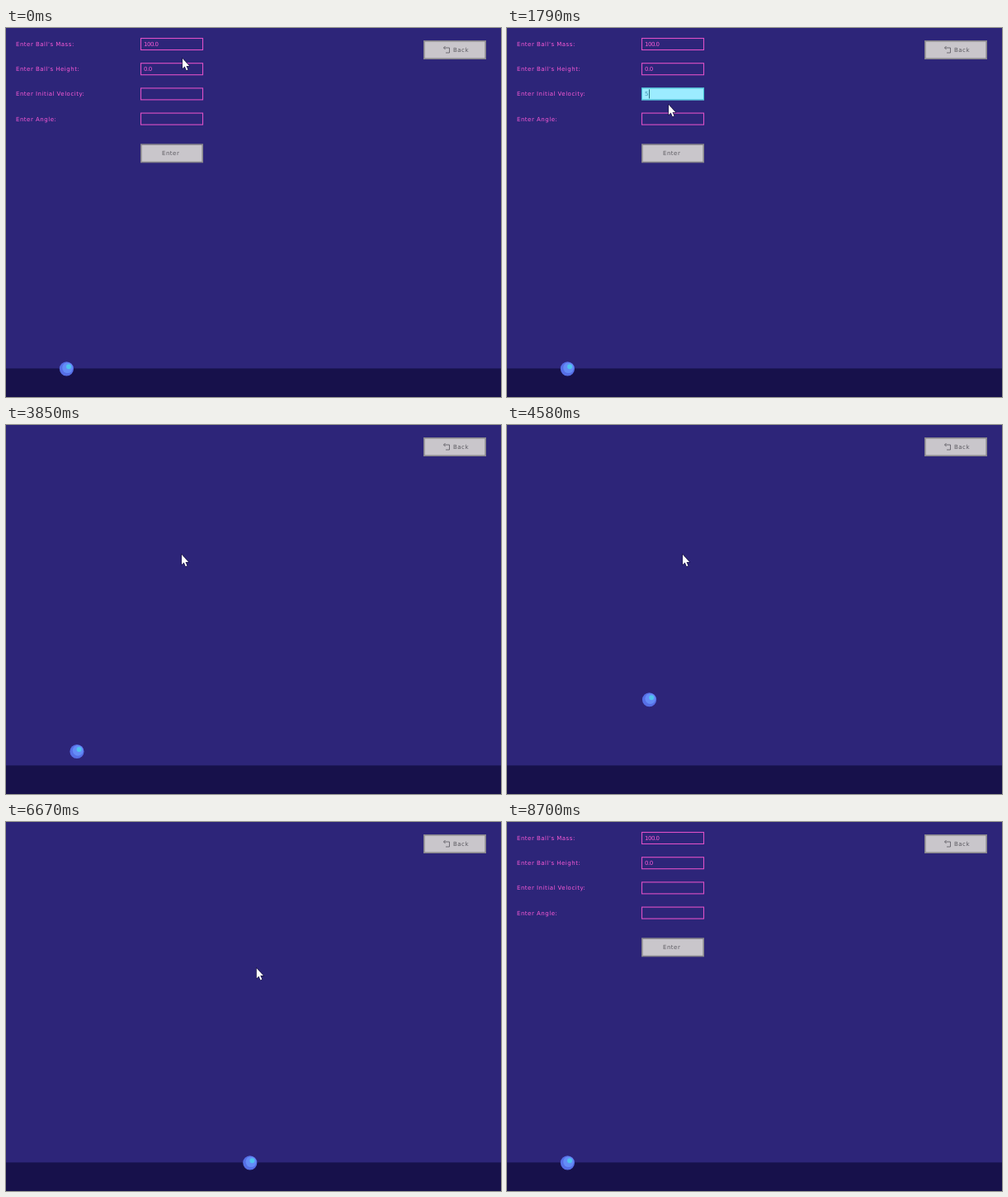
Write an HTML page with a canvas that moves like this. It is 600 by 447 pixels and loops after 9580 ms.

```html
<!DOCTYPE html>
<html lang="en">
<head>
<meta charset="utf-8">
<title>Projectile form</title>
<style>
  html, body { margin: 0; width: 100%; height: 100%; overflow: hidden; background: #2d2579; }
  canvas { display: block; }
</style>
</head>
<body>
<canvas id="stage" width="600" height="447"></canvas>
<script>
const ctx = document.getElementById('stage').getContext('2d');
const LOOP = 9580;
const PINK = '#fa5ad6';
const LEFT = 12, COLUMN = 163, TOP = 12, ROW = 30.2, WIDTH = 76;
const LAUNCH = 3745, FLIGHT = 1875, SPEED = 0.1186, APEX = 81;
const FORM_OUT = 3640, FORM_IN = 7480;
const VELOCITY_FOCUS = 1450, ANGLE_FOCUS = 2390;

function ease(t, from, to) {
  const u = Math.min(Math.max((t - from) / (to - from), 0), 1);
  return u * u * (3 - 2 * u);
}

function rect(x, y, w, h, color) {
  ctx.fillStyle = color;
  ctx.fillRect(x, y, w, h);
}

function disc(x, y, r, color) {
  ctx.fillStyle = color;
  ctx.beginPath();
  ctx.arc(x, y, r, 0, 2 * Math.PI);
  ctx.fill();
}

function text(str, x, y, color, spacing = 0.5) {
  ctx.font = '7px "DejaVu Sans", sans-serif';
  ctx.textBaseline = 'alphabetic';
  ctx.letterSpacing = spacing + 'px';
  ctx.fillStyle = color;
  ctx.fillText(str, x, y);
  return ctx.measureText(str).width;
}

function button(x, y, label, labelX) {
  rect(x, y, WIDTH, 23, '#88868c');
  rect(x + 1.6, y + 1.6, WIDTH - 3.2, 19.8, '#c9c6cb');
  text(label, labelX, y + 14, '#5c5a60');
}

function field(row, label, value, active) {
  const y = TOP + row * ROW;
  text(label, LEFT, y + 10, PINK);
  if (active) rect(COLUMN, y, WIDTH, 15, '#9cecff');
  ctx.lineWidth = 1.1;
  ctx.strokeStyle = active ? '#45bfd3' : '#dd50c6';
  ctx.strokeRect(COLUMN + 0.5, y + 0.5, WIDTH - 1, 14);
  const width = text(value, COLUMN + 4, y + 10, active ? '#3c8fae' : PINK, -0.5);
  if (active) rect(Math.round(COLUMN + 5 + width), y + 2, 1, 11, '#25707f');
}

// Reveals one more character every gap milliseconds.
function typed(str, t, start, gap) {
  return str.slice(0, Math.max(0, Math.floor((t - start) / gap) + 1));
}

function form(t) {
  const filled = t < FORM_OUT;
  field(0, "Enter Ball's Mass:", '100.0');
  field(1, "Enter Ball's Height:", '0.0');
  field(2, 'Enter Initial Velocity:', filled ? typed('50', t, 1750, 260) : '',
    t >= VELOCITY_FOCUS && t < ANGLE_FOCUS);
  field(3, 'Enter Angle:', filled ? typed('55', t, 2730, 150) : '',
    t >= ANGLE_FOCUS && filled);
  button(COLUMN, 140.3, 'Enter', 189);
}

function ball(t) {
  const s = t < FORM_IN ? Math.min(Math.max(t - LAUNCH, 0), FLIGHT) : 0;
  const x = 73.4 + SPEED * s;
  const y = 412.8 - 4 * APEX * s * (FLIGHT - s) / FLIGHT ** 2;
  disc(x, y, 8.6, '#566fe6');
  disc(x + 1.2, y - 1.2, 6.4, '#648cf7');
  disc(x + 2.6, y - 2.6, 3, '#50c4ec');
}

function backButton() {
  button(506, 15, 'Back', 542);
  ctx.strokeStyle = '#66646a';
  ctx.lineWidth = 0.9;
  ctx.stroke(new Path2D('M533 30h4.5v-6h-7m2-2l-2 2l2 2'));
}

function pointer(t) {
  let x = 214, y = 37;
  const move = (from, to, nextX, nextY) => {
    const u = ease(t, from, to);
    x += (nextX - x) * u;
    y += (nextY - y) * u;
  };
  move(30, 700, 200, 81);
  move(VELOCITY_FOCUS, 1600, 196, 93);
  move(2240, 2580, 254, 131);
  move(2960, 3300, 213, 157);
  move(6330, 6910, 357, 189);
  move(7910, 8690, 572, -18);

  const arrow = new Path2D('M0 0v12l2.7-2.4l2 4.6l1.8-.8l-2-4.5h3.6z');
  ctx.save();
  ctx.translate(x, y);
  ctx.lineWidth = 1.1;
  ctx.strokeStyle = '#18143c';
  ctx.stroke(arrow);
  ctx.fillStyle = '#fff';
  ctx.fill(arrow);
  ctx.restore();
}

function draw(t) {
  rect(0, 0, 600, 447, '#2d2579');
  rect(0, 412.4, 600, 35, '#17114b');
  if (t < FORM_OUT || t >= FORM_IN) form(t);
  backButton();
  ball(t);
  pointer(t);
}

const start = performance.now();
function tick() {
  draw((performance.now() - start) % LOOP);
  requestAnimationFrame(tick);
}
tick();
</script>
</body>
</html>
```
